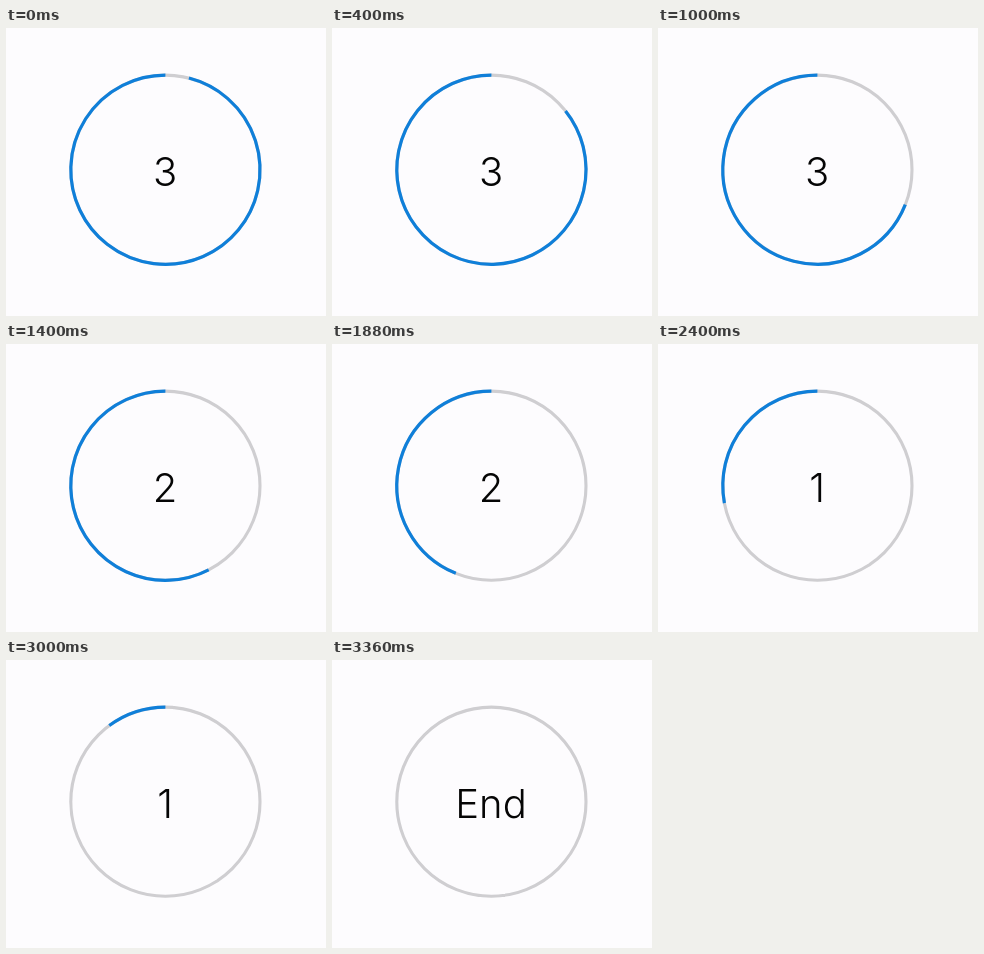
An HTML page that plays this animation: 320x288 px, repeating every 4.76 s.

```html
<!DOCTYPE html>
<html lang="en">
<head>
<meta charset="utf-8">
<title>Countdown</title>
<style>
  html, body { margin: 0; width: 100%; height: 100%; overflow: hidden; background: #fdfcfe; }
  svg { display: block; width: 100%; height: 100%; }
  circle { fill: none; stroke-width: 3.1; }
  text { font: 300 40px Inter, Roboto, sans-serif; text-anchor: middle; fill: #050505; }
</style>
</head>
<body>
<svg viewBox="0 0 320 288">
  <circle cx="159.4" cy="141.7" r="94.6" stroke="#cfced1"/>
  <path id="arc" fill="none" stroke="#0f7fd9" stroke-width="3.2"/>
  <text id="label" x="159" y="157.6"></text>
</svg>
<script>
const LOOP = 4760, STEP = 40, END = 3360;
const CX = 159.4, CY = 141.7, R = 94.6;
// [ms, degrees clockwise from the top]
const SWEEP = [[0, 14.4], [400, 51.6], [1000, 111.7], [1880, 202.1], [2400, 259.4], [3000, 323.6], [END, 360]];
const arc = document.getElementById('arc');
const label = document.getElementById('label');

function angleAt(t) {
  const i = Math.max(1, SWEEP.findIndex(p => p[0] >= t));
  const [t0, a0] = SWEEP[i - 1], [t1, a1] = SWEEP[i];
  return a0 + (a1 - a0) * (t - t0) / (t1 - t0);
}

function render(ms) {
  const t = Math.floor((ms % LOOP) / STEP) * STEP;
  const done = t >= END;
  const deg = done ? 360 : angleAt(t);
  const a = deg * Math.PI / 180;
  const x = CX + R * Math.sin(a), y = CY - R * Math.cos(a);
  const large = deg < 180 ? 1 : 0;
  arc.setAttribute('d', done ? '' : `M${x} ${y}A${R} ${R} 0 ${large} 1 ${CX} ${CY - R}`);
  const text = done ? 'End' : String(3 - Math.floor(deg / 120));
  if (label.textContent !== text) label.textContent = text;
}

const start = performance.now();
function tick() {
  render(performance.now() - start);
  requestAnimationFrame(tick);
}
tick();
</script>
</body>
</html>
```
